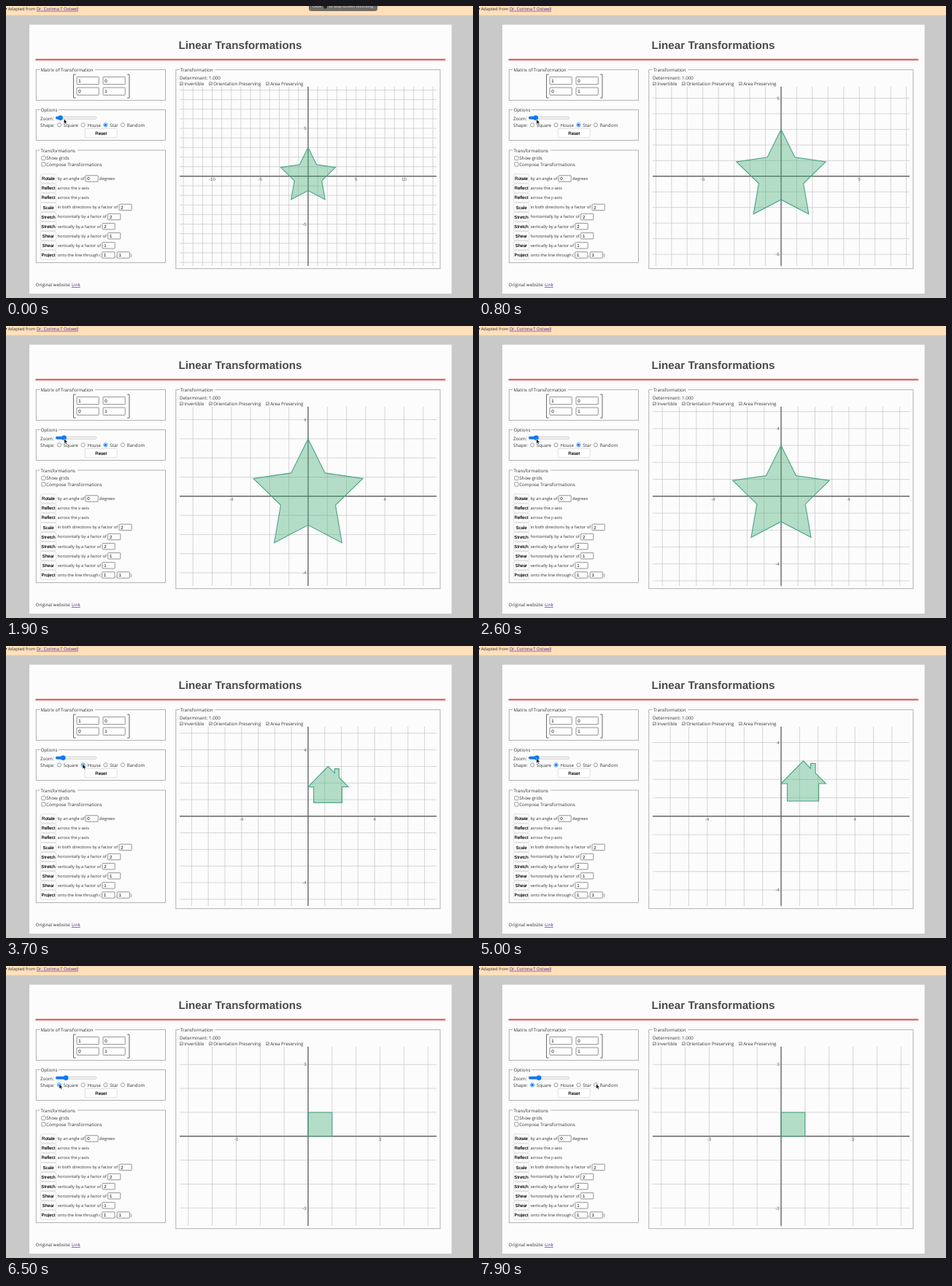
An HTML page for the animation above (8 s loop, 640x401 px).

```html
<!DOCTYPE html>
<html lang="en">
<head>
<meta charset="utf-8">
<title>Linear Transformations</title>
<style>
  html, body { margin: 0; width: 100%; height: 100%; overflow: hidden; background: #c9c9c9; }
  svg { display: block; width: 100%; height: 100%; }
  text { font: 6.2px "Open Sans", "Noto Sans", sans-serif; fill: #333; text-rendering: geometricPrecision; white-space: pre; }
  .row { font-size: 5.7px; }
  .head { font-size: 5.8px; }
  .ui { font: 6.1px "Liberation Sans", Arial, sans-serif; fill: #000; }
  .btn { stroke: #000; stroke-width: .14; }
  .title { font: bold 15.2px "Liberation Sans", Arial, sans-serif; fill: #4a4a4a; }
  .tick { font: 6.2px "Liberation Sans", Arial, sans-serif; fill: #666; }
  .link { fill: #551a8b; text-decoration: underline; }
  .toast { font: 5.6px "Liberation Sans", Arial, sans-serif; fill: #e9e5e0; }
</style>
</head>
<body>
<svg id="stage" viewBox="0 0 640 401" preserveAspectRatio="none">
  <defs><clipPath id="clip"><rect x="238" y="110.5" width="352" height="246.5"/></clipPath></defs>
</svg>
<script>
const LOOP = 8000, STEP = 100;
const CX = 414, CY = 233.8, LEFT = 238, RIGHT = 590, TOP = 110.5, BOTTOM = 357;
const stage = document.getElementById('stage');

function add(tag, attrs, parent = stage) {
  const el = document.createElementNS('http://www.w3.org/2000/svg', tag);
  for (const k in attrs) el.setAttribute(k, attrs[k]);
  parent.append(el);
  return el;
}
function rect(x, y, width, height, fill, more = {}, parent) {
  return add('rect', { x, y, width, height, fill, ...more }, parent);
}
function path(d, stroke, width, more = {}, parent) {
  return add('path', { d, stroke, 'stroke-width': width, fill: 'none', ...more }, parent);
}
function text(x, y, str, cls = '', more = {}, parent) {
  const el = add('text', { x, y, class: cls, ...more }, parent);
  el.textContent = str;
  return el;
}

function fieldset(x, y, w, h, title, titleW) {
  rect(x, y, w, h, 'none', { stroke: '#a9a9a9', 'stroke-width': .9 });
  rect(x + 5, y - 2, titleW + 2.5, 4, '#fcfcfc');
  text(x + 6.2, y + 2.5, title);
}
function input(x, y, w, h, value) {
  rect(x, y, w, h, '#fff', { stroke: '#767676', 'stroke-width': .8, rx: .8 });
  text(x + 2.3, y + h / 2 + 2.2, value, 'ui');
}
function button(x, y, w, h, label) {
  rect(x, y, w, h, '#fff', { stroke: '#d6d6d6', 'stroke-width': .8, rx: 1.6 });
  text(x + w / 2, y + h / 2 + 2.2, label, 'ui btn', { 'text-anchor': 'middle' });
}
function checkbox(y, label) {
  rect(48.8, y, 5.2, 5.2, '#fff', { stroke: '#767676', 'stroke-width': .7, rx: 1 });
  text(55.2, y + 4.8, label);
}
function flag(x, label) {
  rect(x + .3, 104.8, 4, 4, 'none', { stroke: '#555', 'stroke-width': .5 });
  path(`M${x + 1.2} 106.8l1 1.1l1.6-2.3`, '#444', .6);
  text(x + 6.2, 109, label);
}

// Page
rect(0, 0, 640, 401, '#c9c9c9');
rect(0, 0, 640, 12.7, '#fee0bb');
add('circle', { cx: .4, cy: 3.8, r: .9, fill: '#333' });
text(2.7, 5.8, 'Adapted from ', 'head');
text(41.9, 5.8, 'Dr. Corinna T Ostwell', 'head link');
rect(32, 25.7, 578.7, 369.3, '#fcfcfc');
text(321, 59.4, 'Linear Transformations', 'title', { 'text-anchor': 'middle' });
rect(40.5, 72.6, 561.7, 2.1, '#dc5553');

// Matrix
fieldset(41.3, 87.4, 177.2, 42.2, 'Matrix of Transformation', 73);
path('M95.5 94H92.5V126.2H95.5M166 94H169V126.2H166', '#444', .8);
[[97, 97.4, 1], [133, 97.4, 0], [97, 112.1, 0], [133, 112.1, 1]]
  .forEach(([x, y, v]) => input(x, y, 30.3, 10.2, v));

// Options
fieldset(41.3, 142.6, 177.2, 41.8, 'Options', 23);
text(47, 157, 'Zoom:');
rect(68, 151.9, 55.8, 3.4, '#efefef', { stroke: '#b2b2b2', 'stroke-width': .5, rx: 1.7 });
const fill = rect(68, 151.8, 8, 3.6, '#0075ff', { rx: 1.8 });
const thumb = add('circle', { cx: 74.5, cy: 153.6, r: 3.4 });
text(47, 165.6, 'Shape:');
const radios = {};
[['square', 73, 'Square'], ['house', 105.6, 'House'], ['star', 136.4, 'Star'], ['random', 160, 'Random']]
  .forEach(([key, x, label]) => {
    const ring = add('circle', { cx: x, cy: 163.3, r: 2.6, fill: '#fff', 'stroke-width': .7 });
    const dot = add('circle', { cx: x, cy: 163.3, r: 1.6, fill: '#0075ff' });
    radios[key] = { ring, dot };
    text(x + 5.8, 165.6, label);
  });
button(108.3, 168.2, 43.8, 12.6, 'Reset');

// Transformations
fieldset(41.3, 198, 177.2, 154.4, 'Transformations', 49);
checkbox(206.2, 'Show grids');
checkbox(214.8, 'Compose Transformations');
[
  ['Rotate', 'by an angle of', 109, 0],
  ['Reflect', 'across the x-axis'],
  ['Reflect', 'across the y-axis'],
  ['Scale', 'in both directions by a factor of', 155, 2],
  ['Stretch', 'horizontally by a factor of', 139.6, 2],
  ['Stretch', 'vertically by a factor of', 132, 2],
  ['Shear', 'horizontally by a factor of', 139.6, 1],
  ['Shear', 'vertically by a factor of', 132, 1],
  ['Project', 'onto the line through (', 131.6, 1]
].forEach(([name, label, x, value], i) => {
  const y = 237 + i * 13.12;
  button(47.4, y - 6, 21.2, 12, name);
  const t = text(70.5, y + 2, label, 'row');
  const axis = label.match(/^(.*)([xy])(-axis)$/);
  if (axis) {
    t.textContent = axis[1];
    add('tspan', { 'font-style': 'italic' }, t).textContent = axis[2];
    t.append(axis[3]);
  }
  if (x) input(x, y - 4.2, 17.2, 8.4, value);
  if (i === 0) text(128, y + 2, 'degrees', 'row');
  if (i === 8) {
    text(149.8, y + 2, ',', 'row');
    input(152.2, y - 4.2, 17.2, 8.4, 1);
    text(170.4, y + 2, ')', 'row');
  }
});
text(40.6, 385, 'Original website: ');
text(89.9, 385, 'Link', 'link');

// Plot
fieldset(232.8, 87.4, 362.2, 273.3, 'Transformation', 46);
text(238, 100.6, 'Determinant: 1.000');
flag(238, 'Invertible');
flag(278, 'Orientation Preserving');
flag(356, 'Area Preserving');
const plot = add('g', { 'clip-path': 'url(#clip)' });
const grid = path('', '#c9c9c9', .75, {}, plot);
path(`M${LEFT} ${CY}H${RIGHT}M${CX} ${TOP}V${BOTTOM}`, '#666', 1.4, {}, plot);
const labels = add('g', {}, plot);
const shape = add('polygon', { fill: 'rgba(70,172,117,.4)', stroke: '#48a387', 'stroke-width': 1.1 }, plot);

// Recording notice
const toast = add('g', {});
rect(415, -10, 94, 17, '#716c67', { rx: 3.5 }, toast);
text(420, 2.3, 'Click', 'toast', {}, toast);
add('circle', { cx: 437.6, cy: 1.4, r: 2.3, fill: '#222' }, toast);
text(443, 2.3, 'to stop screen recording', 'toast', {}, toast);

const cursor = path('M0 0V6.6L1.6 5.2L2.6 7.6L3.8 7.1L2.8 4.8H4.9Z', '#fff', .6, { fill: '#000' });

const shapes = {
  star: Array.from({ length: 10 }, (_, i) => {
    const r = i % 2 ? 1.5 : 3, a = i * Math.PI / 5;
    return [r * Math.sin(a), r * Math.cos(a)];
  }),
  house: [[0, 1.77], [1.2, 3], [1.6, 2.59], [1.6, 2.86], [1.86, 2.86], [1.86, 2.34],
    [2.42, 1.77], [2.04, 1.77], [2.04, .82], [.335, .82], [.335, 1.77]],
  square: [[0, 0], [1, 0], [1, 1], [0, 1]]
};

// Tables of [time, values...]
const zoomKeys = [[0, 13.15], [800, 21.45], [1400, 49.5], [1900, 26.3], [2700, 22.8], [4800, 22.8], [5600, 32.85]];
const cursorKeys = [[0, 79.3, 155], [800, 78.8, 155.6], [1400, 88.6, 154.6], [1900, 79.8, 154.8],
  [2700, 78.5, 155], [3300, 105, 162.3], [4100, 105, 162.3], [4700, 78.3, 154.6], [4900, 78.3, 154.4],
  [5600, 81.8, 153.6], [5800, 81.8, 153.6], [6400, 73, 162], [7000, 73, 162], [7800, 160.6, 162]];

function sample(keys, t) {
  const i = keys.findIndex(k => k[0] > t);
  if (i < 0) return keys[keys.length - 1].slice(1);
  const a = keys[i - 1], b = keys[i], p = (t - a[0]) / (b[0] - a[0]);
  return a.slice(1).map((v, j) => v + (b[j + 1] - v) * p);
}

function drawPlot(scale, kind) {
  const half = 176 / scale;
  const every = Math.min(5, Math.ceil(half / 2));
  let d = '';
  labels.replaceChildren();
  for (let n = -Math.floor(half); n <= half; n++) {
    if (!n) continue;
    const x = CX + n * scale, y = CY - n * scale;
    const yIn = y > TOP && y < BOTTOM;
    d += `M${x} ${TOP}V${BOTTOM}`;
    if (yIn) d += `M${LEFT} ${y}H${RIGHT}`;
    if (n % every) continue;
    text(x, CY + 6.2, n, 'tick', { 'text-anchor': 'middle' }, labels);
    if (yIn) text(CX - 2.3, y + 2.2, n, 'tick', { 'text-anchor': 'end' }, labels);
  }
  grid.setAttribute('d', d);
  shape.setAttribute('points', shapes[kind].map(([x, y]) => [CX + x * scale, CY - y * scale]).join(' '));
}

function render(t) {
  const [scale] = sample(zoomKeys, t);
  const [x, y] = sample(cursorKeys, t);
  const kind = t < 3300 ? 'star' : t < 6400 ? 'house' : 'square';
  drawPlot(scale, kind);

  const pos = 74.5 + (scale - 13.15) / 2.6;
  const hover = (t >= 4600 && t < 4900) || (t >= 5600 && t < 5900);
  const color = hover ? '#0058c0' : '#0b78fb';
  thumb.setAttribute('cx', pos);
  thumb.setAttribute('fill', color);
  fill.setAttribute('width', pos - 68);
  fill.setAttribute('fill', color);

  for (const key in radios) {
    const on = key === kind;
    radios[key].ring.setAttribute('stroke', on ? '#0075ff' : '#767676');
    radios[key].dot.setAttribute('visibility', on ? 'visible' : 'hidden');
  }
  cursor.setAttribute('transform', `translate(${x} ${y})`);
  toast.setAttribute('opacity', Math.max(0, Math.min(1, 1 - t / 400)));
}

function frame() {
  const t = performance.now() % LOOP;
  render(Math.floor(t / STEP) * STEP);
  requestAnimationFrame(frame);
}
frame();
</script>
</body>
</html>
```
